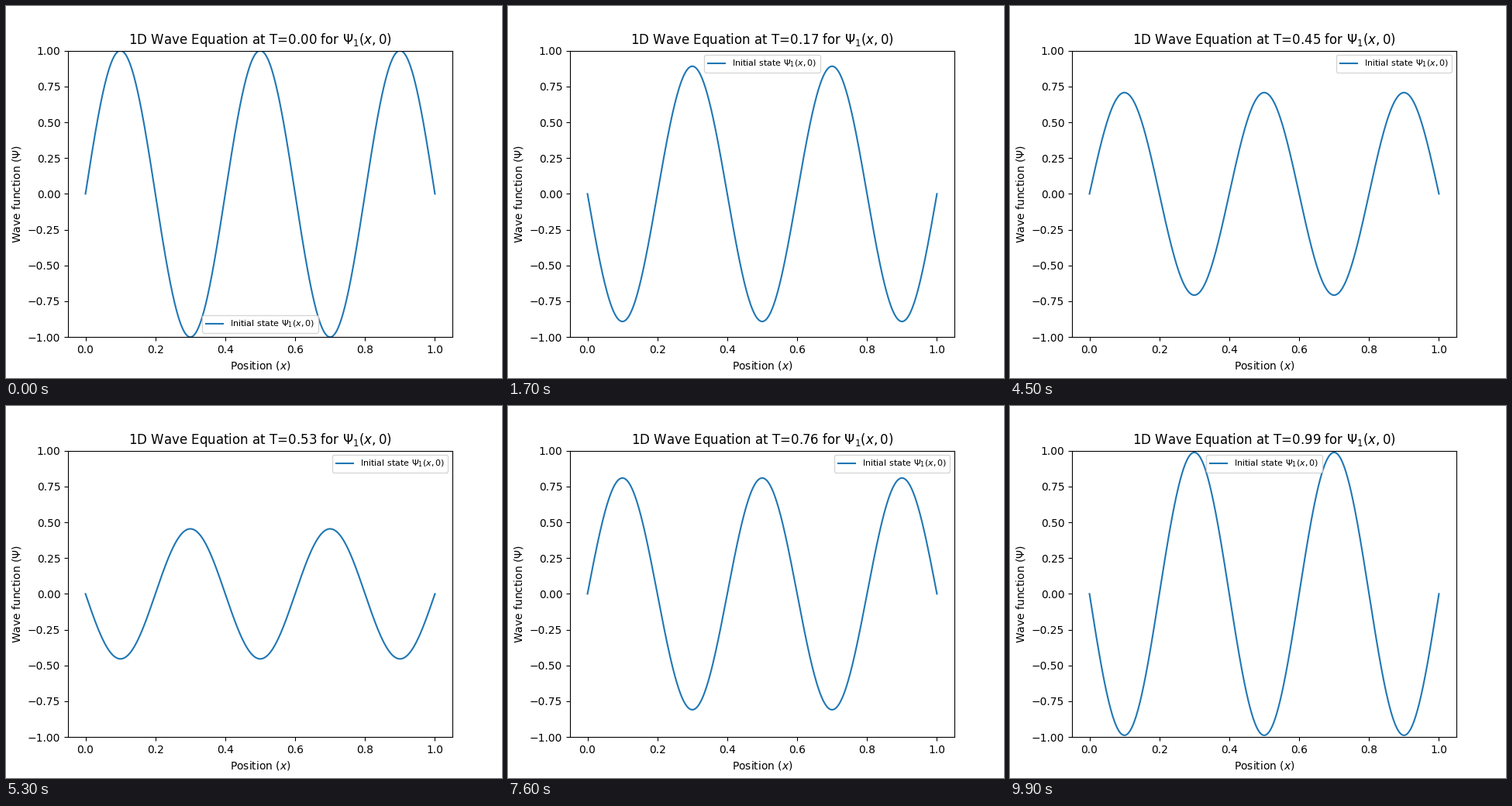
A matplotlib script for the animation above (10000 ms loop, 640 by 480 pixels).

```python
import numpy as np
import matplotlib.pyplot as plt
from matplotlib.animation import FuncAnimation

FRAMES = 100
INTERVAL = 100  # ms
DT = 0.01
K = 5 * np.pi  # wave number of the standing wave, with unit speed

x = np.linspace(0, 1, 1000)

fig, ax = plt.subplots(figsize=(6.4, 4.8), dpi=100)
line, = ax.plot(x, np.sin(K * x), label=r"Initial state $\Psi_1(x,0)$")
ax.set_ylim(-1, 1)
ax.set_xlabel(r"Position ($x$)")
ax.set_ylabel(r"Wave function ($\Psi$)")
ax.legend(loc="best", fontsize=8)
title = ax.set_title("")


def update(i):
    t = i * DT
    line.set_ydata(np.sin(K * x) * np.cos(K * t))
    title.set_text(rf"1D Wave Equation at T={t:.2f} for $\Psi_1(x,0)$")
    return line, title


anim = FuncAnimation(fig, update, frames=FRAMES, interval=INTERVAL,
                     repeat=True, repeat_delay=0, blit=False)
plt.show()
```
